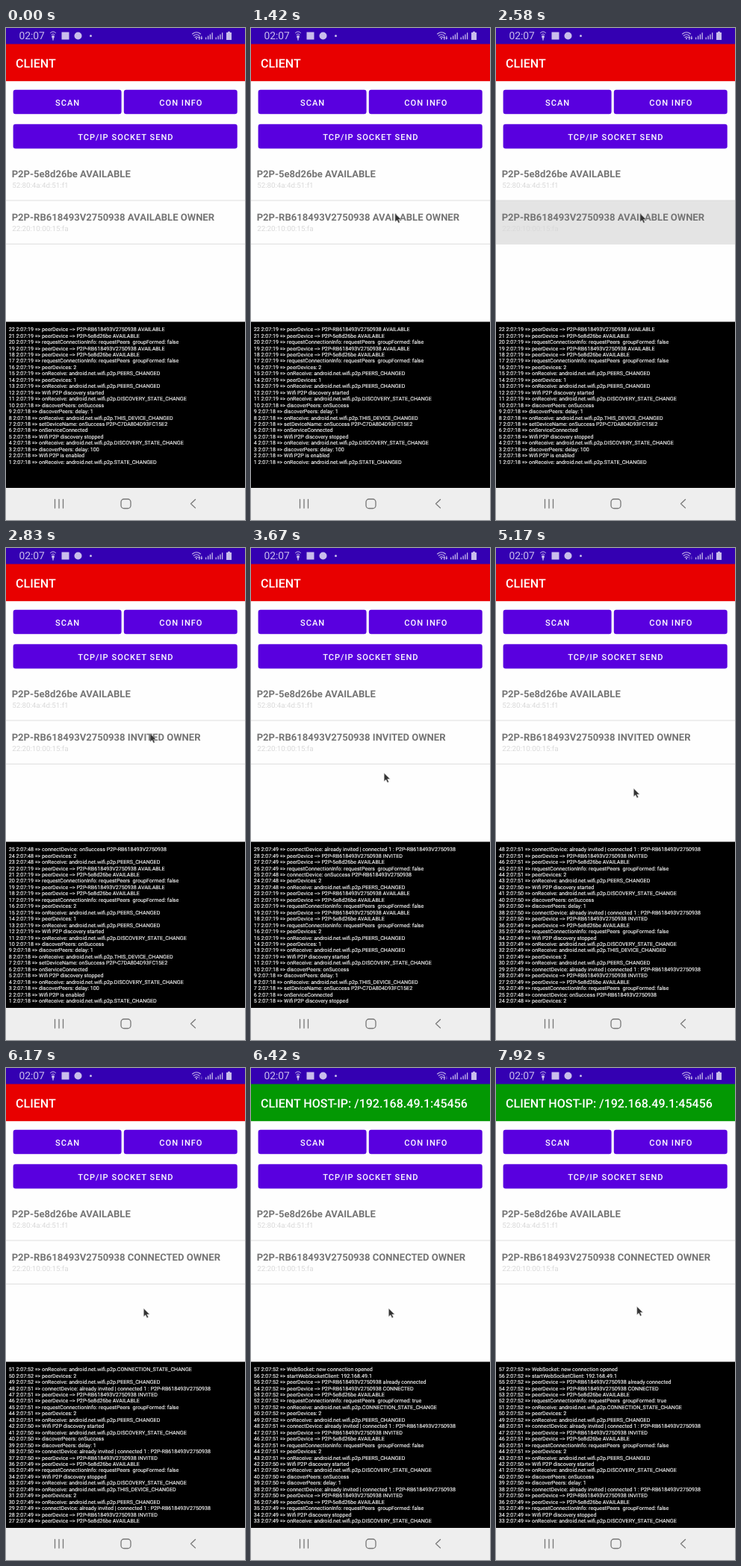
An HTML page that plays this animation: 320 px wide and 659 px high, repeating every 8000 ms.

```html
<!DOCTYPE html>
<html lang="en">
<head>
<meta charset="utf-8">
<title>P2P client</title>
<style>
  html, body { margin: 0; width: 100%; height: 100%; overflow: hidden; background: #fff; }
  svg { display: block; width: 100vw; height: 100vh; font-family: Roboto, sans-serif; text-rendering: geometricPrecision; }
  text { white-space: pre; }
  .title { font-size: 16.05px; font-weight: 500; fill: #fff; }
  .button { font-size: 11.1px; font-weight: 500; letter-spacing: .0893em; fill: #fff; text-anchor: middle; }
  .name { font-size: 13.05px; font-weight: 700; fill: #757575; }
  .mac { font-size: 9.75px; fill: #d9d9d9; }
  .log { font-size: 7.13px; fill: #fff; stroke: #fff; stroke-width: .12px; }
  .line { fill: none; stroke-linecap: round; stroke-linejoin: round; }
</style>
</head>
<body>
<svg viewBox="0 0 320 659" preserveAspectRatio="none">
  <rect width="320" height="659" fill="#fefefe"/>

  <rect width="320" height="22" fill="#3400b2"/>
  <g fill="#c9bdec" stroke="#c9bdec" stroke-width="0">
    <text x="17.500" y="15.200" font-size="13.800">02:07</text>
    <path class="line" stroke-width="1" d="M59.500 6.500q3.500-3.500 7 0M61 8.700q2-1.800 4 0"/>
    <path d="M61.300 10h3.400v3l-1 1v2.500h-1.400v-2.500l-1-1z"/>
    <rect x="74.500" y="5.500" width="10" height="10"/>
    <circle cx="96.500" cy="10.500" r="5"/>
    <circle cx="113.500" cy="10.500" r="1.500"/>
    <path class="line" stroke-width="1.100" d="M249.500 8q5.500-4.500 11 0M251.300 10.300q3.700-3 7.400 0M253 12.500q2-1.600 4 0"/>
    <circle cx="255" cy="14.300" r="1"/>
    <path id="arrowUp" d="M257.300 13.200l1.500-2.500 1.500 2.500h-.9v2.600h-1.200v-2.600z"/>
    <path id="arrowDown" d="M260.300 13.300l1.500 2.500 1.500-2.500h-.9v-2.600h-1.200v2.600z"/>
    <path id="bars" d="M267 12.500h1.300v2.800h-1.300zM270 10.500h1.300v4.800h-1.300zM272.800 8.500h1.300v6.800h-1.300zM275.500 6.200h1.300v9.100h-1.300z"/>
    <use href="#bars" x="13.500"/>
    <path d="M297 4.800h3v1.200h2v10h-7v-10h2z"/>
  </g>

  <rect id="toolbar" y="21.500" width="320" height="49.700"/>
  <text id="title" class="title" x="13.100" y="52.600"></text>

  <g fill="#5900df">
    <rect x="9.600" y="82.700" width="145" height="32.600" rx="3.200"/>
    <rect x="157.800" y="82.700" width="151.900" height="32.600" rx="3.200"/>
    <rect x="9.600" y="128.800" width="300.100" height="32.600" rx="3.200"/>
  </g>
  <text class="button" x="82.600" y="103.500">SCAN</text>
  <text class="button" x="234.400" y="103.500">CON INFO</text>
  <text class="button" x="160.400" y="149.700">TCP/IP SOCKET SEND</text>

  <g id="list">
    <rect id="ripple" y="231" width="320" height="58" fill="#000"/>
    <path d="M0 231h320M0 289.300h320" stroke="#dedede"/>
    <text id="peerA" class="name" x="7.700" y="199.900"></text>
    <text class="mac" x="8.200" y="214.300">52:80:4a:4d:51:f1</text>
    <text id="peerB" class="name" x="7.700" y="258.100"></text>
    <text class="mac" x="8.200" y="272.400">22:20:10:00:15:fa</text>
  </g>

  <rect y="393.500" width="320" height="223" fill="#000"/>
  <g id="log"></g>

  <rect y="616" width="320" height="43" fill="#eee"/>
  <g class="line" stroke="#777" stroke-width="1.300">
    <path d="M65.500 631.500v11.500M71 631.500v11.500M76.500 631.500v11.500M253.500 631.500l-6 5.700 6 5.700"/>
    <rect x="154" y="631" width="13" height="12.500" rx="4"/>
  </g>

  <path id="cursor" d="M0 0v11l2.600-2.300 1.900 4 1.800-.9-1.900-3.800h3.600z" fill="#333" stroke="#ddd" stroke-width=".5"/>
</svg>

<script>
const LOOP = 8000, TICK = 1000 / 12, ROWS = 25;
const $ = id => document.getElementById(id);

const A = 'P2P-5e8d26be', B = 'P2P-RB618493V2750938', SELF = 'P2P-C7DA804D93FC15E2';
const receive = action => 'onReceive: android.net.wifi.p2p.' + action;
const request = formed => 'requestConnectionInfo: requestPeers  groupFormed: ' + formed;
const peer = (name, state) => `peerDevice --> ${name} ${state}`;
const count = n => 'peerDevices: ' + n;
const discovery = receive('DISCOVERY_STATE_CHANGE');
const changed = receive('PEERS_CHANGED');
const renamed = receive('THIS_DEVICE_CHANGED');
const started = 'Wifi P2P discovery started', stopped = 'Wifi P2P discovery stopped';
const delay = 'discoverPeers: delay: 1', success = 'discoverPeers: onSuccess';
const already = 'connectDevice: already invited | connected 1 : ' + B;
const available = [request(false), peer(A, 'AVAILABLE'), peer(B, 'AVAILABLE')];
const invited = [request(false), peer(A, 'AVAILABLE'), peer(B, 'INVITED')];

// Messages grouped by the second in which they were logged
const messages = [
  [18, receive('STATE_CHANGED'), 'Wifi P2P is enabled', delay + '00', discovery, stopped,
    'onServiceConnected', 'setDeviceName: onSuccess ' + SELF, renamed, delay, success],
  [19, discovery, started, changed, count(1), changed, count(2), ...available, ...available],
  [48, changed, count(2), 'connectDevice: onSuccess ' + B],
  [49, ...invited, already, changed, count(2), renamed, discovery, stopped, ...invited.slice(0, 2)],
  [50, invited[2], already, delay, success, discovery, started],
  [51, changed, count(2), ...invited, already],
  [52, changed, count(2), receive('CONNECTION_STATE_CHANGE'), request(true), peer(A, 'AVAILABLE'),
    peer(B, 'CONNECTED'), peer(B, 'already connected'), 'startWebSocketClient: 192.168.49.1',
    'WebSocket: new connection opened'],
].flatMap(([second, ...texts]) => texts.map(text => `2:07:${second} => ${text}`))
  .map((text, i) => `${i + 1} ${text}`);

// Stepped values: [start time, value]
const logSize = [[0, 22], [2660, 25], [3500, 29], [3750, 34], [3830, 38], [3915, 42], [5080, 48], [6165, 51], [6330, 57]];
const peerState = [[0, 'AVAILABLE'], [2660, 'INVITED'], [6165, 'CONNECTED']];
const listShown = [[0, 1], [3830, 0], [5080, 1]];
const rippleAlpha = [[0, 0], [2500, .06], [2580, .1], [2660, .06], [2750, .03], [2830, 0]];
const upAlpha = [[0, 1], [4915, .3], [6330, 1]];
const downAlpha = [[0, 1], [4915, .3], [6750, 1]];
const valueAt = (steps, t) => steps.findLast(([start]) => start <= t)[1];

// Pointer moves: start time, number of ticks, from x, y, to x, y
const moves = [
  [665, 5, 287.5, 281, 216.5, 238.5],
  [1165, 4, 210.5, 241, 193, 248.5],
  [3498, 3, 188, 266, 178.2, 301.5],
  [3748, 3, 180, 309, 183.5, 322],
  [4330, 1, 184.3, 322, 184.3, 322],
  [7830, 2, 186.5, 320.5, 188.7, 319.5],
];

const rows = Array.from({ length: ROWS }, (_, i) => {
  const row = document.createElementNS('http://www.w3.org/2000/svg', 'text');
  row.setAttribute('class', 'log');
  row.setAttribute('x', 3.7);
  row.setAttribute('y', 406.2 + i * 8.45);
  return $('log').appendChild(row);
});

function drawCursor(t) {
  const move = moves.findLast(([start]) => start <= t);
  $('cursor').setAttribute('visibility', move ? 'visible' : 'hidden');
  if (!move) return;
  const [start, ticks, x0, y0, x1, y1] = move;
  const p = ticks > 1 ? Math.min(1, Math.floor((t - start) / TICK) / (ticks - 1)) : 1;
  $('cursor').setAttribute('transform', `translate(${x0 + (x1 - x0) * p} ${y0 + (y1 - y0) * p})`);
}

function draw(t) {
  const connected = t >= 6330;
  $('toolbar').setAttribute('fill', connected ? '#039803' : '#e80000');
  $('title').textContent = 'CLIENT' + (connected ? ' HOST-IP: /192.168.49.1:45456' : '');
  $('peerA').textContent = A + ' AVAILABLE';
  $('peerB').textContent = `${B} ${valueAt(peerState, t)} OWNER`;
  $('list').setAttribute('opacity', valueAt(listShown, t));
  $('ripple').setAttribute('opacity', valueAt(rippleAlpha, t));
  $('arrowUp').setAttribute('opacity', valueAt(upAlpha, t));
  $('arrowDown').setAttribute('opacity', valueAt(downAlpha, t));
  const size = valueAt(logSize, t);
  rows.forEach((row, i) => row.textContent = messages[size - 1 - i] || '');
  drawCursor(t);
}

function frame() {
  draw(performance.now() % LOOP);
  requestAnimationFrame(frame);
}
frame();
</script>
</body>
</html>
```
